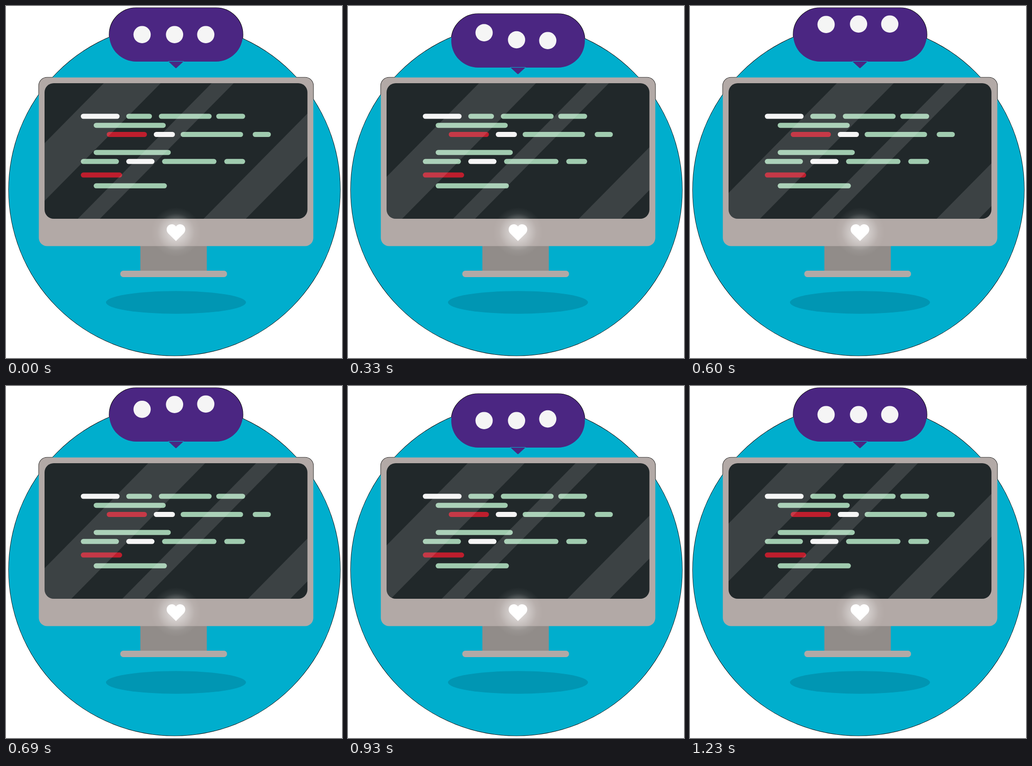
Recreate the animation shown at these times as an HTML page with a canvas. Size 732 by 766 pixels, loop 1260 ms.

```html
<!DOCTYPE html>
<html lang="en">
<head>
<meta charset="utf-8">
<title>Computer with speech bubble</title>
<style>
  html, body { margin: 0; width: 100%; height: 100%; overflow: hidden; background: #fff; }
  canvas { display: block; }
</style>
</head>
<body>
<canvas id="stage" width="732" height="766"></canvas>
<script>
const ctx = document.getElementById('stage').getContext('2d');
const TICK = 30, TICKS = 42;
const GREEN = '#a0cbaf', WHITE = '#f5f5f5', RED = '#be1e2d', METAL = '#b2a9a6';

// Each row: centre y, then [left, right, colour] for every bar
const CODE = [
  [240, [163, 247.5, WHITE], [262, 318, GREEN], [333, 448, GREEN], [458, 521, GREEN]],
  [259.7, [191, 348, GREEN]],
  [279.5, [219.5, 307, RED], [322, 368, WHITE], [380.5, 516.5, GREEN], [537.5, 577, GREEN]],
  [318.7, [191, 359, GREEN]],
  [338.3, [163, 246, GREEN], [262, 323.5, WHITE], [340, 458.5, GREEN], [475.5, 521, GREEN]],
  [367.8, [163, 253, RED]],
  [391.3, [191, 350.5, GREEN]]
];

// Left and right ends of the glare bands along the top of the screen
const GLARE = [[213, 337], [448, 496], [722, 814]];
const GLARE_SLOPE = 0.988;

function ease(p) {
  p = Math.min(1, Math.max(0, p));
  return p * p * (3 - 2 * p);
}

// Rises from a to b, stays, falls from c to d
const pulse = (n, a, b, c, d) => ease((n - a) / (b - a)) - ease((n - c) / (d - c));

function rounded(left, top, right, bottom, radius) {
  const path = new Path2D();
  path.roundRect(left, top, right - left, bottom - top, radius);
  return path;
}

function oval(x, y, rx, ry = rx) {
  const path = new Path2D();
  path.ellipse(x, y, rx, ry, 0, 0, Math.PI * 2);
  return path;
}

function fill(path, color) {
  ctx.fillStyle = color;
  ctx.fill(path);
}

function bubbleShape(y) {
  const path = rounded(225, 4 + y, 516, 121 + y, 58.5);
  path.addPath(new Path2D(`M353 ${120 + y}L368.5 ${134.3 + y}Q370.3 ${136 + y} 372 ${134.3 + y}L387.5 ${120 + y}Z`));
  return path;
}

const disc = oval(367, 400, 361);
const monitor = rounded(71.5, 155.5, 669.5, 522.5, 18);
const screen = rounded(84, 168, 656.7, 463, 20);
const heart = new Path2D('M370.3 511.5L353.5 495C348.8 490 349 482 353.5 478C358.5 473.5 366.5 473.8 370.3 480C374 473.8 382 473.5 387 478C391.6 482 391.8 490 387 495Z');

function drawScreen(shift) {
  fill(screen, '#21282a');
  for (const [y, ...bars] of CODE) {
    for (const [left, right, color] of bars) {
      fill(rounded(left, y - 5.5, right, y + 5.5, 5.5), color);
    }
  }
  ctx.save();
  ctx.clip(screen);
  ctx.fillStyle = 'rgba(255,255,255,0.12)';
  const lean = 295 * GLARE_SLOPE;
  for (const [left, right] of GLARE) {
    ctx.beginPath();
    ctx.moveTo(left + shift, 168);
    ctx.lineTo(right + shift, 168);
    ctx.lineTo(right + shift - lean, 463);
    ctx.lineTo(left + shift - lean, 463);
    ctx.fill();
  }
  ctx.restore();
}

function drawHeart() {
  const glow = ctx.createRadialGradient(370.3, 492, 10, 370.3, 492, 54);
  glow.addColorStop(0, 'rgba(255,255,255,0.55)');
  glow.addColorStop(0.4, 'rgba(255,255,255,0.28)');
  glow.addColorStop(0.7, 'rgba(255,255,255,0.07)');
  glow.addColorStop(1, 'rgba(255,255,255,0)');
  fill(oval(370.3, 492, 54), glow);
  fill(heart, '#fff');
}

function draw(n) {
  const bubbleY = n >= 4 && Math.floor((n - 4) / 10) % 2 === 0 ? 13 : 0;
  const bubble = bubbleShape(bubbleY);

  ctx.fillStyle = '#fff';
  ctx.fillRect(0, 0, 732, 766);

  // Thin dark rim, visible only around the outer silhouette
  ctx.strokeStyle = '#000';
  ctx.lineWidth = 1.6;
  for (const path of [disc, monitor, bubble]) ctx.stroke(path);

  fill(disc, '#00aecd');
  fill(oval(370.3, 645, 152.5, 24.7), '#0096b3');
  fill(rounded(292.7, 515, 437.5, 580, 0), '#918c89');
  fill(rounded(249, 576, 481.5, 590, 6.5), METAL);
  fill(monitor, METAL);
  drawScreen(109 * pulse(n, 0, 18, 18, 42));
  drawHeart();

  fill(bubble, '#4b2682');
  [296.5, 367.2, 435.2].forEach((x, i) => {
    const k = n - 3 * i;
    fill(oval(x, 62.2 + bubbleY - 23 * pulse(k, 7, 13, 19, 27), 18.8), WHITE);
  });
}

function loop() {
  draw(Math.floor(performance.now() / TICK) % TICKS);
  requestAnimationFrame(loop);
}
loop();
</script>
</body>
</html>
```
